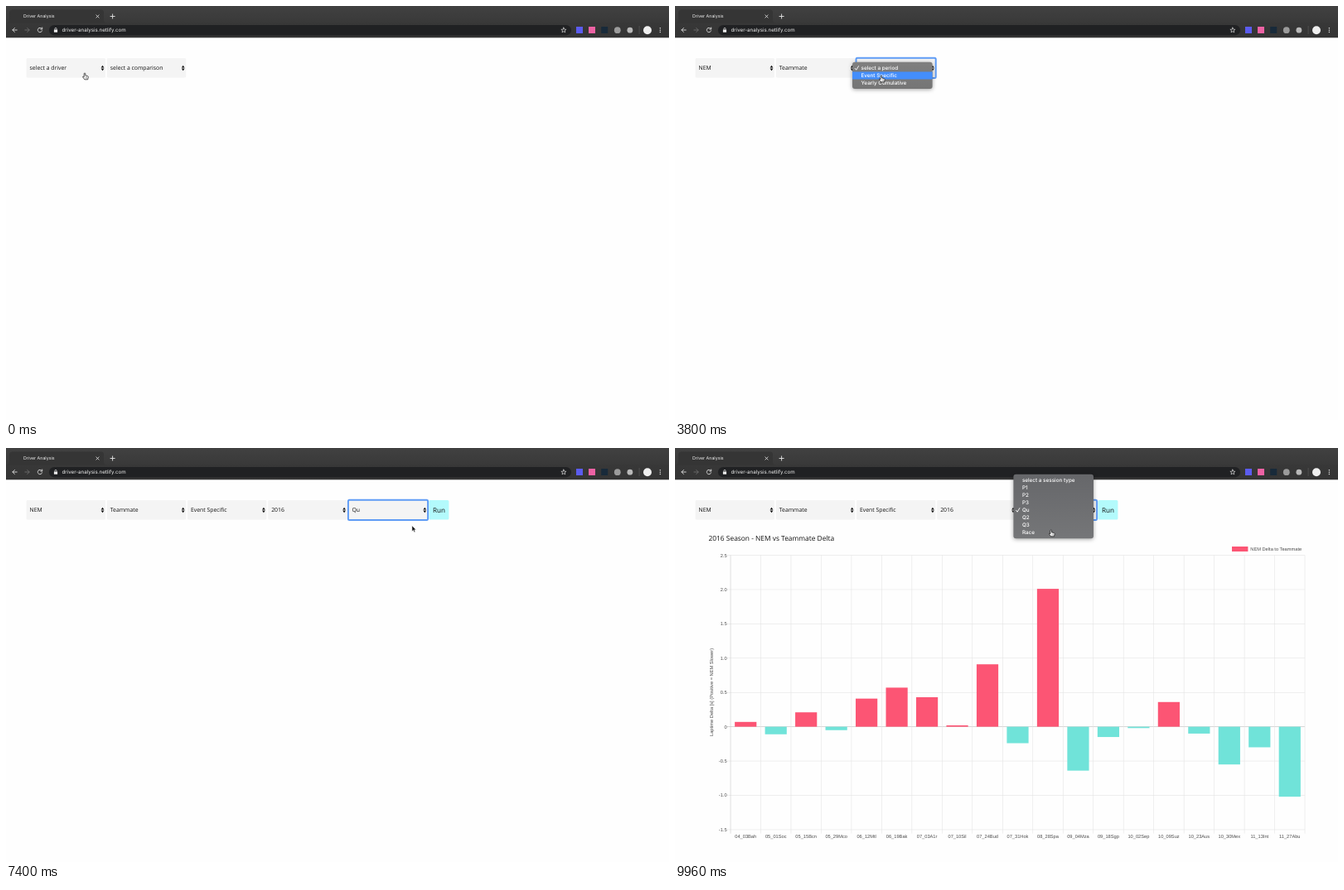
Animation of 800x500 px, one loop 10 s. Source, as an HTML page:

```html
<!DOCTYPE html>
<html lang="en">
<head>
<meta charset="utf-8">
<title>Driver Analysis</title>
<style>
html, body { margin: 0; width: 100%; height: 100%; overflow: hidden; background: #fefefe; }
svg { display: block; width: 800px; height: 500px; }
text { text-rendering: geometricPrecision; white-space: pre; }
.ui { font-family: Inter, Roboto, sans-serif; }
.page { font-family: "Open Sans", "Noto Sans", sans-serif; fill: #111; }
.chart { font-family: "Liberation Sans", Arial, sans-serif; font-size: 5.7px; fill: #4c4c4c; }
.drop { filter: drop-shadow(0 1.5px 2.5px rgba(0, 0, 0, .36)); }
</style>
</head>
<body>
<svg id="stage" viewBox="0 0 800 500" xmlns="http://www.w3.org/2000/svg"></svg>
<script>
const LOOP = 10000, ROW = 9.04, FADE = 180, CHART = 7945, RUN_CLICK = 7900;
const DRIVER = 'NEM';
const stage = document.getElementById('stage');

function add(tag, attrs = {}, parent = stage, text) {
  const el = document.createElementNS('http://www.w3.org/2000/svg', tag);
  for (const k in attrs) el.setAttribute(k, attrs[k]);
  if (text !== undefined) el.textContent = text;
  parent.append(el);
  return el;
}
const set = (el, attrs) => { for (const k in attrs) el.setAttribute(k, attrs[k]); };
const show = (el, on) => { el.style.display = on ? '' : 'none'; };
const rect = (x, y, width, height, fill, parent, rx = 0) =>
  add('rect', { x, y, width, height, fill, rx }, parent);
const dot = (cx, cy, r, fill, parent) => add('circle', { cx, cy, r, fill }, parent);
const line = (d, stroke, width, parent) =>
  add('path', { d, stroke, fill: 'none', 'stroke-width': width, 'stroke-linecap': 'round', 'stroke-linejoin': 'round' }, parent);
const label = (x, y, size, text, cls, parent, more = {}) =>
  add('text', { x, y, class: cls, 'font-size': size, ...more }, parent, text);

// Gradients
const defs = add('defs');
function gradient(id, from, to) {
  const g = add('linearGradient', { id, x2: 0, y2: 1 }, defs);
  add('stop', { 'stop-color': from }, g);
  add('stop', { offset: 1, 'stop-color': to }, g);
}
gradient('strip', '#414141', '#393939');
gradient('bar', '#383838', '#343434');
gradient('low', '#7f7f7f', '#757575');
gradient('high', '#66676a', '#757678');

// Browser window
function browser() {
  rect(0, 0, 800, 500, '#fefefe');
  rect(0, 0, 800, 20.5, 'url(#strip)');
  rect(0, 20, 800, 18.3, 'url(#bar)');
  add('path', { d: 'M1 20.5Q4 20 4 17V8Q4 4.5 7.5 4.5H114.5Q118 4.5 118 8V17Q118 20 121 20.5Z', fill: '#353535' });
  label(21, 14.4, 5.3, 'Driver Analysis', 'ui', stage, { fill: '#f0f0f0' });
  line('M108.9 10.9l3.2 3.2m0-3.2l-3.2 3.2', '#e8e8e8', .8);
  line('M126 12.5h5.2m-2.6-2.6v5.2', '#e8e8e8', .9);
  line('M13.2 29H8m2.4-2.5L7.9 29l2.5 2.5', '#dedede', .9);
  line('M22.9 29h5.2m-2.4-2.5l2.5 2.5l-2.5 2.5', '#6c6c6c', .9);
  line('M43.2 27.4A2.7 2.7 0 1 0 43.6 29.8M43.7 26v2h-2', '#dedede', .9);
  rect(52, 23, 630, 12.4, '#202123', stage, 6.2);
  rect(57.9, 28.4, 4.2, 3.3, '#ececec', stage, .5);
  line('M58.9 28.4v-.9a1.1 1.1 0 0 1 2.2 0v.9', '#ececec', .7);
  label(67.5, 31.3, 6.2, 'driver-analysis.netlify.com', 'ui', stage, { fill: '#f0f0f0' });
  let star = '';
  for (let i = 0; i < 10; i++) {
    const a = i * Math.PI / 5 - Math.PI / 2, r = i % 2 ? 1.4 : 3.2;
    star += (i ? 'L' : 'M') + (672.9 + r * Math.cos(a)).toFixed(2) + ' ' + (29.3 + r * Math.sin(a)).toFixed(2);
  }
  line(star + 'Z', '#dcdcdc', .7);
  rect(688, 25, 8, 8, '#5b5cf0');
  rect(703, 25, 8, 8, '#ee62a4');
  rect(718.2, 25, 8, 8, '#182a3a');
  dot(737.8, 29.2, 3.9, '#9b9b9b');
  dot(752.9, 29.2, 3.4, '#b9b9b9');
  rect(763.8, 24, .5, 10, '#666');
  dot(774, 29.2, 5, '#efefef');
  for (const y of [26.8, 29.2, 31.6]) dot(789.4, y, .75, '#dedede');
}
browser();

// Select boxes
const boxX = i => 24.6 + 97.2 * i;
const prompts = ['select a driver', 'select a comparison', 'select a period', 'select a year', 'select a session type'];
const values = [DRIVER, 'Teammate', 'Event Specific', '2016', 'Qu'];
const appear = [0, 0, 2400, 4160, 4160];
const boxes = prompts.map((p, i) => {
  const g = add('g'), x = boxX(i);
  rect(x, 63, 95.4, 23.6, '#f4f4f4', g, 1.5);
  const text = label(x + 4, 77.2, 6.85, p, 'page', g);
  add('path', { d: `M${x + 90} 74.4l1.9-2.6l1.9 2.6zm0 1.2l1.9 2.6l1.9-2.6z`, fill: '#111' }, g);
  return { g, text };
});
const run = add('g');
rect(510.4, 63, 24, 23.6, '#b3fafc', run, 1.5);
label(515.1, 77.8, 8.1, 'Run', 'page', run);
const ring = add('rect', { y: 62.8, height: 24.2, rx: 1.5, fill: 'none', stroke: '#5f9cf5', 'stroke-width': 2 });

// Chart
const chart = add('g'), L = 67, R = 760, TOP = 129.5, UNIT = 82.85;
const yOf = v => TOP + (2.5 - v) * UNIT, STEP = (R - L) / 19;
const races = ('04_03Bah 05_01Soc 05_15Bcn 05_29Mco 06_12Mtl 06_19Bak 07_03A1r 07_10Sil 07_24Bud 07_31Hok ' +
  '08_28Spa 09_04Mza 09_18Sgp 10_02Sep 10_09Suz 10_23Aus 10_30Mex 11_13Int 11_27Abu').split(' ');
const deltas = [.07, -.11, .21, -.05, .41, .57, .43, .02, .91, -.24, 2.01, -.64, -.15, -.02, .36, -.1, -.55, -.3, -1.02];

label(40.5, 111.9, 8.4, `2016 Season - ${DRIVER} vs Teammate Delta`, 'page', chart);
rect(672, 119, 19.4, 6, '#fc5574', chart);
label(694.3, 124, 5.7, `${DRIVER} Delta to Teammate`, 'chart', chart);
for (let i = 0; i <= 8; i++) {
  const v = 2.5 - i / 2, y = yOf(v);
  rect(L - 4.7, y - .25, R - L + 4.7, .55, v ? '#e2e2e2' : '#b8b8b8', chart);
  label(L - 4.4, y + 2, 5.7, v ? v.toFixed(1) : '0', 'chart', chart, { 'text-anchor': 'end' });
}
for (let i = 0; i <= 19; i++)
  rect(L + i * STEP - .25, TOP, .55, 4 * UNIT + 4.7, i ? '#e2e2e2' : '#c8c8c8', chart);
label(0, 0, 5.7, `Laptime Delta [s] (Positive = ${DRIVER} Slower)`, 'chart', chart,
  { 'text-anchor': 'middle', transform: 'translate(46.4 295) rotate(-90)' });
const bars = deltas.map((v, i) => {
  const mid = L + (i + .5) * STEP;
  label(mid, 470.6, 5.7, races[i], 'chart', chart, { 'text-anchor': 'middle' });
  return rect(mid - 13.1, yOf(0), 26.2, 0, v > 0 ? '#fc5574' : '#70e3d9', chart);
});

// Menus
const codes = ('BEX NEM DUV JOL FEN KEZ YOD TUL ZAB WOB PIV HED TAB DRU FOB QUI NUD SKE VEB TEV UDO BIX JUN ' +
  'LYD ZEK KUZ YEB PUF CAZ WIM SEF IZO DEK HUX PLU FIO WYN JEX LUV TOZ NIB RAF ODE EBB ZIG').split(' ');
const sessions = ['P1', 'P2', 'P3', 'Qu', 'Q2', 'Q3', 'Race'];
const menus = [
  { col: 0, open: 420, close: 1020, list: codes },
  { col: 1, open: 1800, close: 2220, list: ['Teammate', 'Field'] },
  { col: 2, open: 2960, close: 3980, list: ['Event Specific', 'Yearly Cumulative'] },
  { col: 3, open: 4900, close: 5580, list: ['2015', '2016', '2017', '2018', '2019'] },
  { col: 4, open: 6200, close: 6980, list: sessions },
  { col: 4, open: 9280, close: LOOP, list: sessions, pick: 4 }
];
for (const m of menus) {
  const rows = [prompts[m.col], ...m.list], x = boxX(m.col) - 5, pick = m.pick || 0;
  m.first = 74.9 - pick * ROW;
  m.count = rows.length;
  const long = m.col === 0;
  const height = m.count * ROW + (long ? 13.4 : 5.2);
  m.g = add('g', { class: 'drop' });
  rect(x, m.first - 7.1, 96.6, height, pick ? 'url(#high)' : long ? '#787878' : 'url(#low)', m.g, 3);
  m.mark = rect(x, 0, 96.6, ROW, '#448efb', m.g);
  rows.forEach((t, i) => label(x + 10.5, m.first + i * ROW + 2.3, 6.33, t, 'ui', m.g, { fill: '#fff', 'font-weight': 500 }));
  line(`M${x + 3.2} 75.3l1.5 1.9l2.8-4.6`, '#fff', .9, m.g);
  if (long) add('path', { d: `M${x + 45.6} 490.4h4.6l-2.3 3.6z`, fill: '#fff' }, m.g);
}

// Pointer: time, x, y of the tip
const path = [
  [0, 95, 81], [420, 95, 80], [600, 95, 80], [940, 94, 89.3], [1160, 94, 89.3],
  [1680, 163, 77], [1880, 163, 77], [2100, 164, 84], [2260, 164, 84],
  [2820, 252, 76], [3020, 252, 76], [3400, 248.8, 84], [4100, 248.8, 84],
  [4760, 348, 76], [4960, 348, 76], [5320, 346.3, 90.3], [5620, 346.3, 90.3],
  [6100, 455, 76], [6280, 455, 76], [6720, 455.3, 112.5], [7080, 455.3, 112.5],
  [7700, 521, 77], [7930, 521, 77], [8160, 563.5, 136], [8360, 572, 150], [8560, 572, 150],
  [9160, 454, 75], [9480, 454, 75], [9860, 453.8, 99], [LOOP, 453.8, 99]
];
const ink = { stroke: '#111', 'stroke-width': .7, fill: '#fff', 'stroke-linejoin': 'round' };
const hand = add('g');
add('path', { ...ink, d: 'M-.8 .8Q-.8 0 0 0Q.8 0 .8 .8V3L3.5 3.5Q4.4 3.8 4.3 4.8L3.7 7.8H-.2L-2.3 4.9Q-2.6 4 -1.7 4.1L-.8 4.8Z' }, hand);
line('M1.2 4.8v1.6M2.5 4.8v1.6', '#333', .4, hand);
const arrow = add('path', { d: 'M0 0V6.9L1.6 5.4L2.7 8L3.9 7.5L2.8 5H4.9Z', fill: '#111', stroke: '#fff', 'stroke-width': .5 });

function pointer(t) {
  let i = 1;
  while (i < path.length - 1 && path[i][0] < t) i++;
  const [t0, x0, y0] = path[i - 1], [t1, x1, y1] = path[i];
  const p = Math.min(1, (t - t0) / (t1 - t0));
  const e = p * p * (3 - 2 * p);
  return [x0 + (x1 - x0) * e, y0 + (y1 - y0) * e];
}

function draw(t) {
  const [x, y] = pointer(t);
  let focus = -1;
  for (const m of menus) {
    const on = t >= m.open && t < m.close + FADE;
    if (t >= m.open) focus = m.col;
    show(m.g, on);
    if (!on) continue;
    const row = Math.max(0, Math.min(m.count - 1, Math.round((y - m.first) / ROW)));
    const blink = t >= m.close - 80 && t < m.close - 30 || m.close === LOOP && t >= LOOP - 80;
    m.mark.setAttribute('y', m.first + (row - .5) * ROW);
    show(m.mark, !blink);
    m.g.setAttribute('opacity', t < m.close ? 1 : 1 - (t - m.close) / FADE);
  }
  if (t >= RUN_CLICK && t < menus[5].open) focus = 5;

  boxes.forEach((b, i) => {
    show(b.g, t >= appear[i]);
    const text = t >= menus[i].close + FADE ? values[i] : prompts[i];
    if (b.text.textContent !== text) b.text.textContent = text;
  });
  show(run, t >= menus[4].close + FADE);
  show(ring, focus >= 0);
  if (focus >= 0) set(ring, { x: boxX(focus) - .5 + (focus === 5 ? -.2 : 0), width: focus === 5 ? 25.4 : 96.2 });

  show(chart, t >= CHART);
  const p = Math.max(0, Math.min(1, (t - CHART) / 1000));
  const grow = 1 - (1 - p) ** 4;
  bars.forEach((bar, i) => {
    const v = deltas[i] * grow;
    set(bar, { y: yOf(Math.max(v, 0)), height: Math.abs(v) * UNIT });
  });

  const inBox = y > 63 && y < 87 && boxes.some((b, i) => t >= appear[i] && x > boxX(i) && x < boxX(i) + 95.4);
  const inRun = y > 63 && y < 87 && x > 510 && x < 535;
  const inMenu = menus.some(m => t >= m.open && t < m.close + FADE);
  const pointing = inBox || inRun || inMenu;
  show(hand, pointing);
  show(arrow, !pointing);
  set(pointing ? hand : arrow, { transform: `translate(${x.toFixed(2)} ${y.toFixed(2)})` });
}

const start = performance.now();
function tick() {
  draw((performance.now() - start) % LOOP);
  requestAnimationFrame(tick);
}
tick();
</script>
</body>
</html>
```
